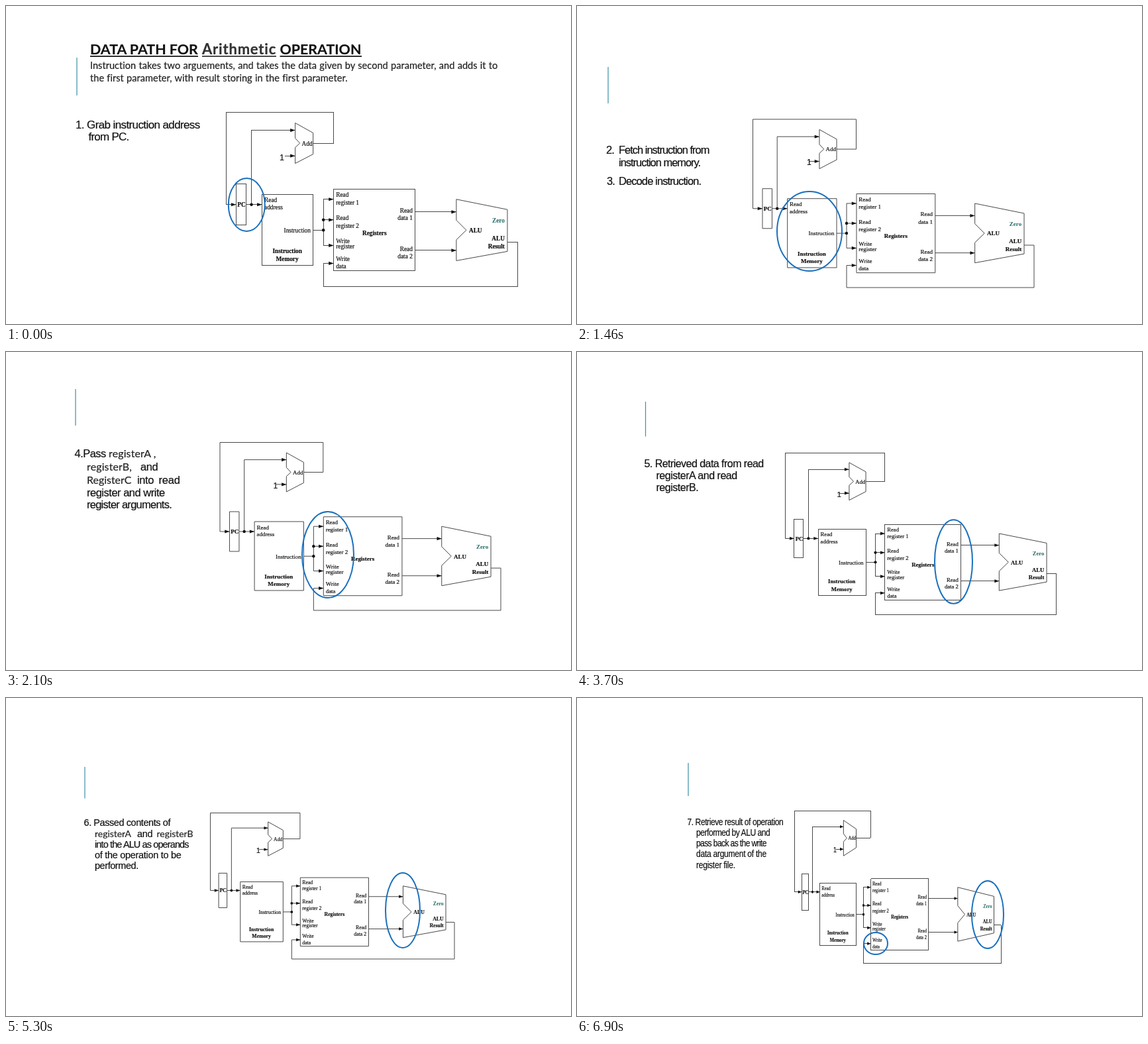
Recreate the animation shown at these times as an HTML page. Size 853 by 480 pixels, loop 8000 ms.

```html
<!DOCTYPE html>
<html lang="en">
<head>
<meta charset="utf-8">
<title>Data path for an arithmetic operation</title>
<style>
html, body { margin: 0; width: 100%; height: 100%; overflow: hidden; background: #fff; }
svg { display: block; width: 853px; height: 480px; }
text {
  font-family: "Liberation Sans", Arial, sans-serif; font-variant-ligatures: none;
  fill: #111; stroke: #111; stroke-width: 0.2;
}
.lato { font-family: Lato, Carlito, sans-serif; fill: #222; stroke: #222; }
.bold { font-weight: 700; }
.label { font: 9.3px "Liberation Serif", "Times New Roman", serif; }
.label.bold, .zero { font-weight: 700; }
.zero { fill: #1f6864; stroke: none; }
.wire { fill: none; stroke: #484848; stroke-width: 1; vector-effect: non-scaling-stroke; }
.crisp { shape-rendering: crispEdges; }
.ring { fill: none; stroke: #1a70bd; stroke-width: 2; }
.accent { stroke: #3a8fa8; stroke-width: 1.2; }
</style>
</head>
<body>
<svg id="stage" viewBox="0 0 853 480"></svg>
<script>
const label = (x, y, text, anchor = 'start', cls = '') =>
  `<text class="label ${cls}" x="${x}" y="${y}" text-anchor="${anchor}">${text}</text>`;
const arrow = (x, y) => `<path d="M${x} ${y}l-7.5 -2.6v5.2z" fill="#111"/>`;
const dot = (x, y) => `<circle cx="${x}" cy="${y}" r="2.3" fill="#111"/>`;
const each = (list, draw) => list.map(item => draw(...item)).join('');

const ORIGIN = [333, 161];
const wires = [
  'M464 207.5H494.5V161H333V300H348', 'M363 300H387M371 300V188H437', 'M421 226.5H437',
  'M464 338.5H479.5M495 292H479.5V361.5H495M479.5 323H495',
  'M618 311H680M618 369H680', 'M757 357H772.5V423H479.5V388.5H495',
  'M348 269h15v62h-15z', 'M387 284.5h77V392h-77z', 'M495 277h123v123h-123z'
].join('');
const units = 'M437 177L464 192V224L437 238V214L444 207.5L437 200Z'
  + 'M680 292L757 307.5V370.5L680 384.5V353L695 338.5L680 323.5Z';

const diagram =
  `<path class="wire crisp" d="${wires}"/><path class="wire" d="${units}"/>`
  + each([[348, 300], [387, 300], [437, 188], [437, 226.5], [495, 292], [495, 323],
    [495, 361.5], [495, 388.5], [680, 311], [680, 369]], arrow)
  + each([[371, 300], [479.5, 323], [479.5, 338.5]], dot)
  + each([
    [447, 211, 'Add'], [390.5, 296.5, 'Read'], [390.5, 307.7, 'address'],
    [420, 342, 'Instruction'],
    [498.5, 288.5, 'Read'], [498.5, 300, 'register 1'],
    [498.5, 323.5, 'Read'], [498.5, 335, 'register 2'],
    [498.5, 358, 'Write'], [498.5, 365.8, 'register'],
    [498.5, 385, 'Write'], [498.5, 396.5, 'data'],
    [614, 312, 'Read', 'end'], [614, 323.5, 'data 1', 'end'],
    [614, 370, 'Read', 'end'], [614, 381.3, 'data 2', 'end'],
    [753, 327, 'Zero', 'end', 'zero'],
    [356, 303.5, 'PC', 'middle', 'bold'], [425, 373, 'Instruction', 'middle', 'bold'],
    [425, 385, 'Memory', 'middle', 'bold'], [556.5, 346, 'Registers', 'middle', 'bold'],
    [699, 342, 'ALU', 'start', 'bold'],
    [753, 354, 'ALU', 'end', 'bold'], [753, 366, 'Result', 'end', 'bold']
  ], label);

// Title runs: x, underline end, text, size, tracking, colour
const titleRun = (x, end, text, size, gap, fill) =>
  `<text class="lato bold" x="${x}" y="73" font-size="${size}" letter-spacing="${gap}" style="fill:${fill}">${text}</text>`
  + `<path d="M${x} 75.8H${end}" stroke="${fill}" stroke-width="1.8"/>`;
const intro = (y, text) =>
  `<text class="lato" x="127" y="${y}" font-size="14.6" word-spacing="0.55">${text}</text>`;
const heading = each([
  [127, 290, 'DATA PATH FOR', 21.4, 0, '#111'],
  [296, 408, 'Arithmetic', 22, 0.8, '#333'],
  [413.5, 537, 'OPERATION', 21.4, 0, '#111']
], titleRun)
  + intro(95, 'Instruction takes two arguements, and takes the data given by second parameter, and adds it to')
  + intro(113.6, 'the first parameter, with result storing in the first parameter.');

// box: diagram left, top, right, bottom; bar: x, top, bottom; one: place of the constant
// lines: x, baseline, text, tracking, class, size
const scenes = [
  { start: 0, box: [332.5, 160.5, 772.5, 423], bar: [107, 78, 135], size: 17, one: [413, 233.2],
    rings: [[363.3, 300, 27.5, 40]], extra: heading,
    lines: [[105, 184.5, '1. Grab instruction address', -0.6], [124.5, 203, 'from PC.', -0.75]] },
  { start: 500, box: [265.5, 171, 690, 425], bar: [47, 92, 147], size: 16.5, one: [347, 239.7],
    rings: [[351, 340, 49, 60]],
    lines: [[44, 223, '2.', -0.9], [63, 223, 'Fetch instruction from', -0.98],
      [63, 241.5, 'instruction memory.', -1], [45, 270, '3.', -0.9],
      [63, 270, 'Decode instruction.', -0.87]] },
  { start: 2100, box: [323, 136.5, 747, 390], bar: [105, 56, 111], size: 16.5, one: [403.5, 205.7],
    rings: [[486, 306, 39, 65]],
    lines: [[103.5, 159, '4.Pass', -0.5], [155, 159, 'registerA ,', 0.15, 'lato', 16],
      [122, 179, 'registerB,', 0.15, 'lato', 16], [203, 179, 'and', -0.4],
      [122, 198.5, 'RegisterC', 0, 'lato', 16], [198, 198.5, 'into', -0.4],
      [230.5, 198.5, 'read', -0.2],
      [122, 218, 'register and write', -0.47], [122, 236.2, 'register arguments.', -0.72]] },
  { start: 3700, box: [314, 152, 723.5, 396], bar: [103.5, 75, 127.5], size: 16, one: [392.5, 218.7],
    rings: [[568.5, 316.5, 28.5, 63.3]],
    lines: [[101.5, 173.5, '5. Retrieved data from read', -0.54],
      [119.5, 191.5, 'registerA and read', -0.48], [119.5, 209.5, 'registerB.', -0.48]] },
  { start: 5300, box: [308.5, 173.5, 677, 394], bar: [119, 104, 151.5], size: 14.5, one: [378, 233.5],
    rings: [[599, 320.5, 26, 56.5]],
    lines: [[117.5, 193, '6. Passed contents of', -0.4],
      [134, 209.5, 'registerA', 0, 'lato', 14], [198, 209.5, 'and', -0.3],
      [227.5, 209.5, 'registerB', 0, 'lato', 14],
      [134, 226, 'into the ALU as operands', -0.86],
      [134, 242, 'of the operation to be', -0.27], [134, 258.2, 'performed.', -0.41]] },
  { start: 6900, box: [328.5, 170.5, 640.5, 401], bar: [168, 98, 148], size: 15, one: [387, 232.7],
    rings: [[620, 327, 24, 51], [451, 370.5, 18, 16.5]],
    lines: [[166.5, 191.5, '7. Retrieve result of operation', -0.55],
      [180, 208, 'performed by ALU and', -0.6], [180, 224, 'pass back as the write', -0.77],
      [180, 240.2, 'data argument of the', -0.35], [180, 256.5, 'register file.', -0.33]] }
];

function draw({ box: [left, top, right, bottom], bar, size, one, rings, lines, extra = '' }) {
  const sx = (right - left) / 439.5, sy = (bottom - top) / 262;
  const squash = sx / sy;
  const line = (x, y, text, gap, cls = '', fontSize = size) =>
    `<text class="${cls}" transform="translate(${x} ${y}) scale(${squash} 1)"`
    + ` font-size="${fontSize}" letter-spacing="${gap}">${text}</text>`;
  const ring = (x, y, rx, ry) =>
    `<ellipse class="ring" cx="${x}" cy="${y}" rx="${rx}" ry="${ry}"/>`;
  return `<path class="accent" d="M${bar[0]} ${bar[1]}V${bar[2]}"/>${extra}`
    + `<g transform="translate(${left} ${top}) scale(${sx} ${sy}) translate(${-ORIGIN[0]} ${-ORIGIN[1]})">${diagram}</g>`
    + each([...lines, [...one, '1', 0, '', 12.5 * sy]], line)
    + each(rings, ring);
}

const stage = document.getElementById('stage');
let shown;
function tick() {
  const time = performance.now() % 8000;
  const scene = scenes.findLast(s => s.start <= time);
  if (scene !== shown) stage.innerHTML = draw(shown = scene);
  requestAnimationFrame(tick);
}
tick();
</script>
</body>
</html>
```
